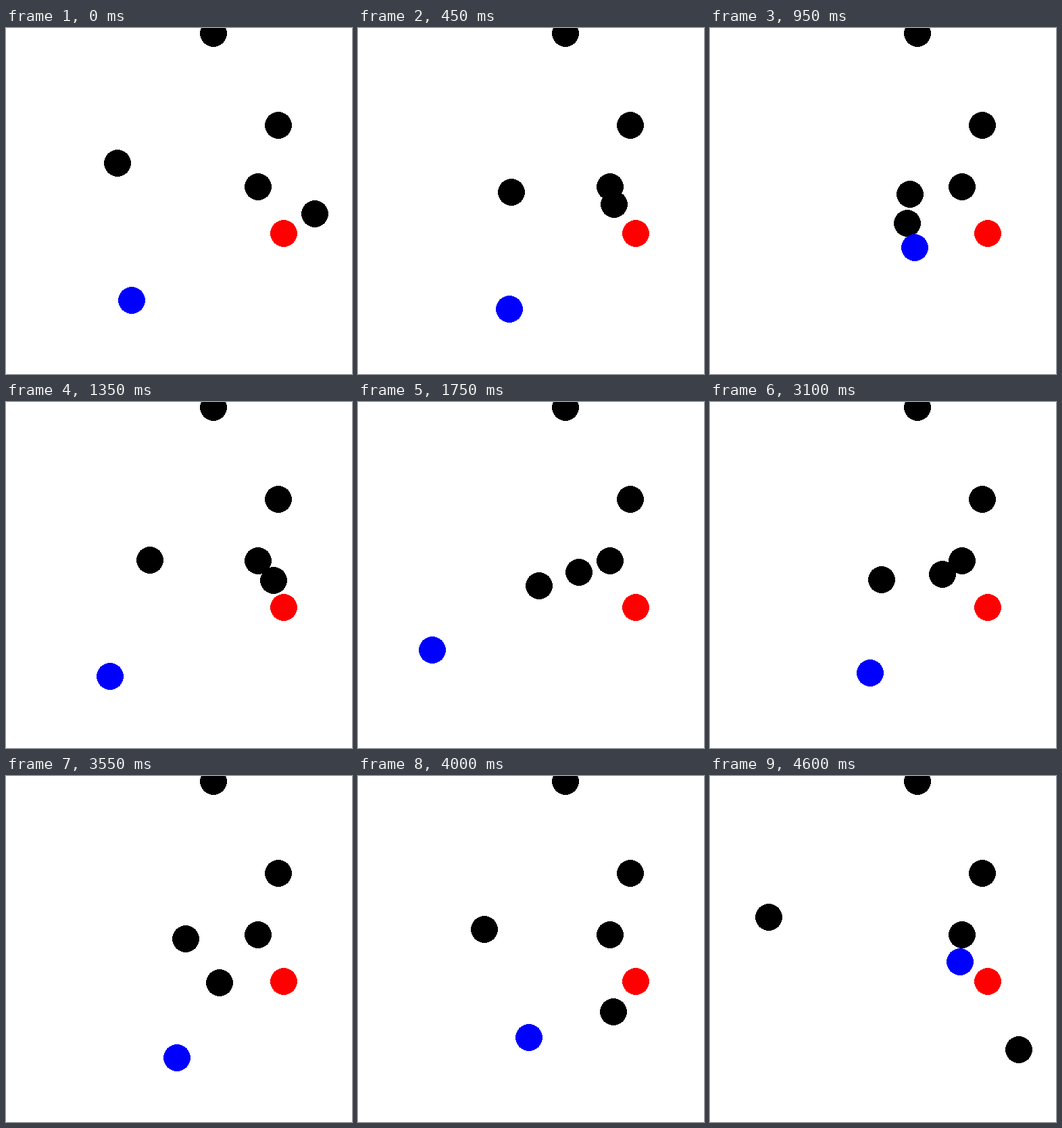
An HTML page for the animation above (4.65 s loop, 512 px wide and 512 px high).

```html
<!DOCTYPE html>
<html lang="en">
<head>
<meta charset="utf-8">
<title>Moving obstacles</title>
<style>
  html, body { margin: 0; width: 100%; height: 100%; overflow: hidden; background: #fff; }
  svg { display: block; width: 100vw; height: 100vh; shape-rendering: crispEdges; }
  circle { r: 19.9px; }
</style>
</head>
<body>
<svg viewBox="0 0 512 512">
  <circle cx="307" cy="8"/>
  <circle cx="403" cy="144"/>
  <circle cx="373" cy="235"/>
  <circle cx="411" cy="304" fill="#f00"/>
  <circle id="a"/>
  <circle id="b"/>
  <circle id="agent" fill="#00f"/>
</svg>
<script>
const STEP = 50, LOOP = 4650, CROSSING = 42.54;

const ramp = (n, from, to) => Math.min(Math.max((n - from) / (to - from), 0), 1);
const smooth = (n, from, to) => {
  const u = ramp(n, from, to);
  return u * u * (3 - 2 * u);
};

// The agent's route in each run, n steps after its reset.
function turnUp(n) {
  const u = n / 18.5;
  return [186 + 40 * u + 77 * u * u, 403 + 124 * u - 202 * u * u];
}

function swingLeft(n) {
  const u = n / 27.5;
  return [183 - 99 * u - 64 * u * u, 397.5 + 31 * Math.cos((n - 0.5) / 5)];
}

function waitThenClimb(n) {
  return [
    171 + 82 * smooth(n, 4.2, 16.4) + 117 * ramp(n, 31, 42.5) ** 1.4,
    412 - 11 * smooth(n, 0, 6) + 16 * smooth(n, 13, 23) - 142 * ramp(n, 23, 42.5) ** 1.75
  ];
}

// Each run ends on contact, halfway through its last step.
const runs = [
  { from: 0, end: 18.5, route: turnUp },
  { from: 20, end: 27.5, route: swingLeft },
  { from: 49, end: 42.5, route: waitThenClimb }
];

const [a, b, agent] = ['a', 'b', 'agent'].map(id => document.getElementById(id));

function place(el, [x, y]) {
  el.setAttribute('cx', Math.round(x));
  el.setAttribute('cy', Math.round(y));
}

function draw(ms) {
  const tick = Math.floor((ms % LOOP) / STEP);
  const run = runs.findLast(r => tick >= r.from);
  const n = Math.min(tick - run.from, run.end);
  const p = n / CROSSING;
  place(a, [165 + 292 * p, 200 + 205 * p]);
  place(b, [457 - 370 * p, 275 - 66 * p]);
  place(agent, run.route(n));
}

const start = performance.now();
function frame() {
  draw(performance.now() - start);
  requestAnimationFrame(frame);
}
frame();
</script>
</body>
</html>
```
